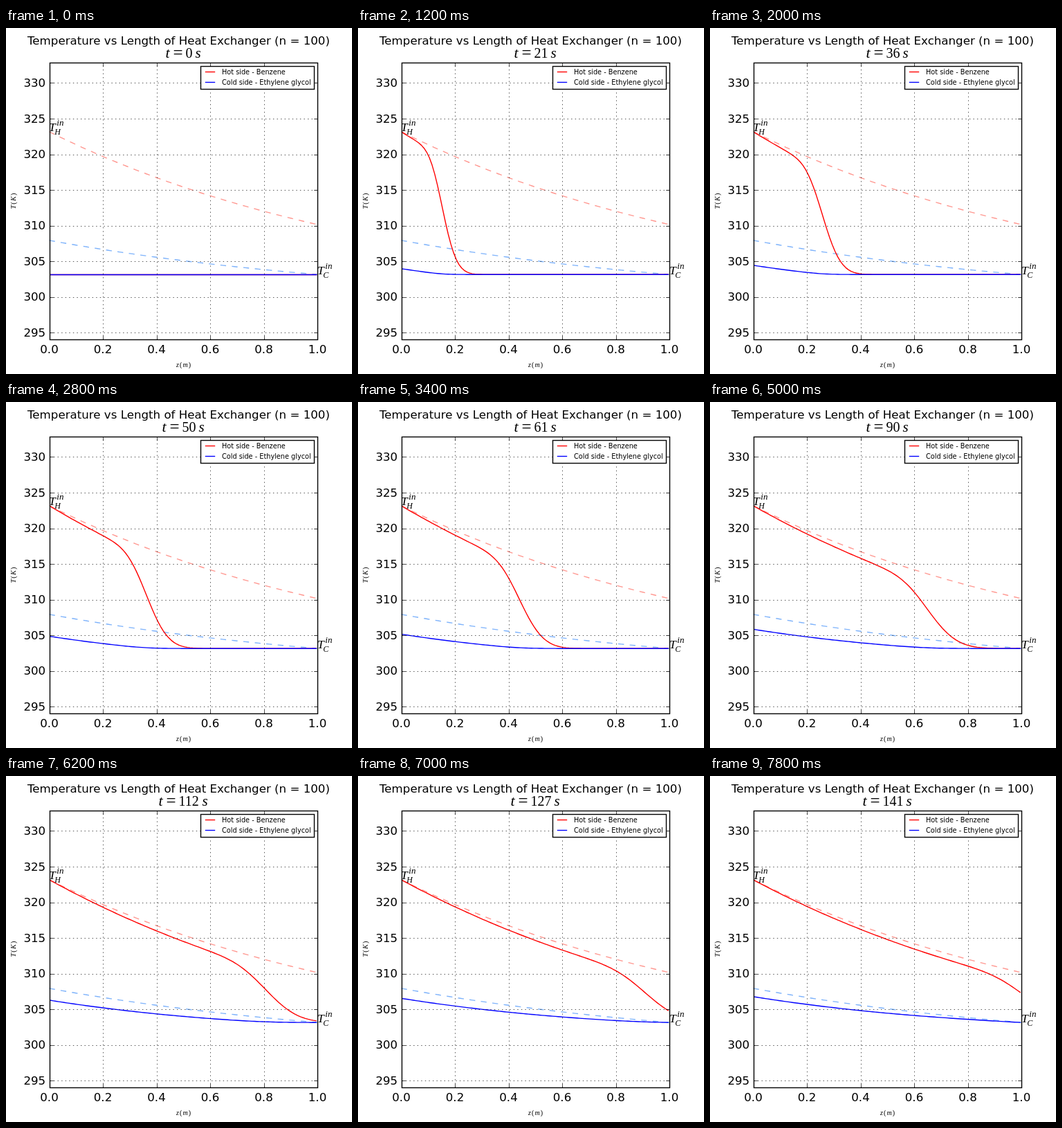
These frames come from a looping animation (500 by 500 pixels, 8 s). An HTML page:

```html
<!DOCTYPE html>
<html lang="en">
<head>
<meta charset="utf-8">
<title>Heat exchanger</title>
<style>
  html, body { margin: 0; width: 100%; height: 100%; overflow: hidden; background: #fff; }
  svg { display: block; width: 100vw; height: 100vh; }
  text { font: 16.67px "DejaVu Sans", sans-serif; white-space: pre; }
  .end { text-anchor: end; }
  .mid { text-anchor: middle; }
  .key { font-size: 9.72px; }
  .math { font-family: "Liberation Serif", serif; }
  .it { font-style: italic; }
  .curve { fill: none; stroke-width: 1.39; stroke-linecap: square; stroke-linejoin: round; }
  .steady { stroke-linecap: butt; stroke-dasharray: 8.33 8.33; }
  .hot { stroke: #f00; }
  .cold { stroke: #00f; }
  .grid { stroke: #000; stroke-width: .69; stroke-dasharray: 1.39 4.17; }
  .tick { stroke: #000; stroke-width: .69; }
  .frame { fill: none; stroke: #000; stroke-width: 1.39; }
</style>
</head>
<body>
<svg id="stage" viewBox="0 0 500 500">
  <rect width="500" height="500" fill="#fff"/>
  <path id="steadyHot" class="curve steady" stroke="#ff9891"/>
  <path id="steadyCold" class="curve steady" stroke="#7db2fb"/>
  <path id="hot" class="curve hot"/>
  <path id="cold" class="curve cold"/>
  <g id="axes"></g>
  <rect class="frame" x="63.5" y="50.5" width="387" height="400"/>

  <text class="mid" x="249.5" y="24">Temperature vs Length of Heat Exchanger (n = 100)</text>
  <text class="math it" id="clockT" y="43" style="font-size:22px">t</text>
  <text class="math" id="clockEq" y="44" style="font-size:25px">=</text>
  <text class="math" id="clockNum" y="43" style="font-size:20px"></text>
  <text class="math it" id="clockS" y="43" style="font-size:21px">s</text>
  <g id="inlets"></g>
  <text class="math mid" x="257.2" y="490" style="font-size:10px;letter-spacing:1.1px"><tspan class="it">z</tspan>(<tspan class="it">m</tspan>)</text>
  <text class="math mid" transform="translate(14 249.5) rotate(-90)" style="font-size:10px;letter-spacing:1.3px"><tspan class="it">T</tspan>(<tspan class="it">K</tspan>)</text>

  <rect class="frame" x="281.5" y="55.5" width="164" height="33" style="fill:#fff"/>
  <path class="curve hot" d="M288.5 63.5H301.5"/>
  <path class="curve cold" d="M288.5 78.5H301.5"/>
  <text class="key" x="312" y="67">Hot side - Benzene</text>
  <text class="key" x="312" y="82">Cold side - Ethylene glycol</text>
</svg>
<script>
const $ = id => document.getElementById(id);
const CELLS = 100, FRAMES = 40, FRAME_MS = 200, SECONDS_PER_FRAME = 3.636;
const HOT_IN = 323.16, COLD_IN = 303.16;
const T_MIN = COLD_IN * 0.97, T_MAX = HOT_IN * 1.03;

const xOf = z => 62.5 + 387.5 * z;
const yOf = T => 450 - 400 * (T - T_MIN) / (T_MAX - T_MIN);
const snap = v => Math.floor(v + 0.5) + 0.5;

function add(parent, tag, attrs, text = '') {
  const el = document.createElementNS('http://www.w3.org/2000/svg', tag);
  for (const name in attrs) el.setAttribute(name, attrs[name]);
  el.textContent = text;
  parent.append(el);
}

const point = (z, T) => xOf(z).toFixed(2) + ' ' + yOf(T).toFixed(2);
const curve = temps => 'M' + temps.map((T, i) => point((i + 0.5) / CELLS, T)).join('L');

// Counterflow exchanger: transfer units per side, flows in cells per second
const HOT_UNITS = 1.228, COLD_UNITS = 0.452;
const HOT_FLOW = 0.73, COLD_FLOW = 1.11;
const HOT_LOSS = HOT_UNITS * HOT_FLOW / CELLS, COLD_GAIN = COLD_UNITS * COLD_FLOW / CELLS;
const hot = new Array(CELLS).fill(COLD_IN);
const cold = new Array(CELLS).fill(COLD_IN);

function advance(seconds, steps) {
  const dt = seconds / steps, last = CELLS - 1;
  for (let s = 0; s < steps; s++) {
    const gap = hot.map((T, i) => T - cold[i]);
    // Only half a cell lies between an inlet and the first cell centre
    for (let i = last; i >= 0; i--) {
      const upstream = i ? hot[i - 1] : HOT_IN;
      const loss = HOT_LOSS * gap[i] * (i ? 1 : 0.5);
      hot[i] += dt * (HOT_FLOW * (upstream - hot[i]) - loss);
    }
    for (let i = 0; i <= last; i++) {
      const upstream = i < last ? cold[i + 1] : COLD_IN;
      const gain = COLD_GAIN * gap[i] * (i < last ? 1 : 0.5);
      cold[i] += dt * (COLD_FLOW * (upstream - cold[i]) + gain);
    }
  }
}

// The flat starting lines sit on whole pixels
const flat = `M${snap(xOf(0.005))} ${snap(yOf(COLD_IN))}H${snap(xOf(0.995))}`;
const poses = [{ hot: flat, cold: flat }];
for (let k = 1; k < FRAMES; k++) {
  advance(SECONDS_PER_FRAME, 150);
  poses.push({ hot: curve(hot), cold: curve(cold) });
}

// Exact steady state: the gap between the sides decays exponentially
const decay = HOT_UNITS - COLD_UNITS;
const area = z => (1 - Math.exp(-decay * z)) / decay;
const gapAtStart = (HOT_IN - COLD_IN) / (1 + COLD_UNITS * area(1));
const steady = temp => 'M' + Array.from({ length: CELLS + 1 },
  (_, i) => point(i / CELLS, temp(i / CELLS))).join('L');
$('steadyHot').setAttribute('d', steady(z => HOT_IN - HOT_UNITS * gapAtStart * area(z)));
$('steadyCold').setAttribute('d', steady(z => HOT_IN - gapAtStart - COLD_UNITS * gapAtStart * area(z)));

for (let i = 0; i <= 5; i++) {
  const x = snap(xOf(i / 5));
  if (i % 5) {
    add($('axes'), 'path', { class: 'grid', d: `M${x} 450.5V50.5` });
    add($('axes'), 'path', { class: 'tick', d: `M${x} 450.5v-5.5M${x} 50.5v5.5` });
  }
  add($('axes'), 'text', { class: 'mid', x: xOf(i / 5), y: 470 }, (i / 5).toFixed(1));
}
for (let T = 295; T <= 330; T += 5) {
  const y = snap(yOf(T));
  add($('axes'), 'path', { class: 'grid', d: `M63.5 ${y}H450.5` });
  add($('axes'), 'path', { class: 'tick', d: `M63.5 ${y}h5.5M450.5 ${y}h-5.5` });
  add($('axes'), 'text', { class: 'end', x: 57.2, y: Math.round(yOf(T) + 5.6) }, T);
}

function inlet(x, y, side) {
  const put = (dx, dy, size, text) => add($('inlets'), 'text',
    { class: 'math it', x: x + dx, y: y + dy, style: `font-size:${size}px` }, text);
  put(-0.5, 0, 17.5, 'T');
  put(7.8, 5, 12, side);
  put(10.8, -8, 13, 'in');
}
inlet(62.5, 149, 'H');
inlet(450.5, 356, 'C');

function draw(k) {
  $('hot').setAttribute('d', poses[k].hot);
  $('cold').setAttribute('d', poses[k].cold);
  const label = String(Math.floor(k * SECONDS_PER_FRAME));
  const left = 235.5 - 5 * label.length;
  $('clockT').setAttribute('x', left);
  $('clockEq').setAttribute('x', left + 11);
  $('clockNum').setAttribute('x', left + 29);
  $('clockS').setAttribute('x', left + 33 + 10 * label.length);
  $('clockNum').textContent = label;
}

const start = performance.now();
let shown = -1;
function tick() {
  const k = Math.floor((performance.now() - start) / FRAME_MS) % FRAMES;
  if (k !== shown) draw(shown = k);
  requestAnimationFrame(tick);
}
tick();
</script>
</body>
</html>
```
